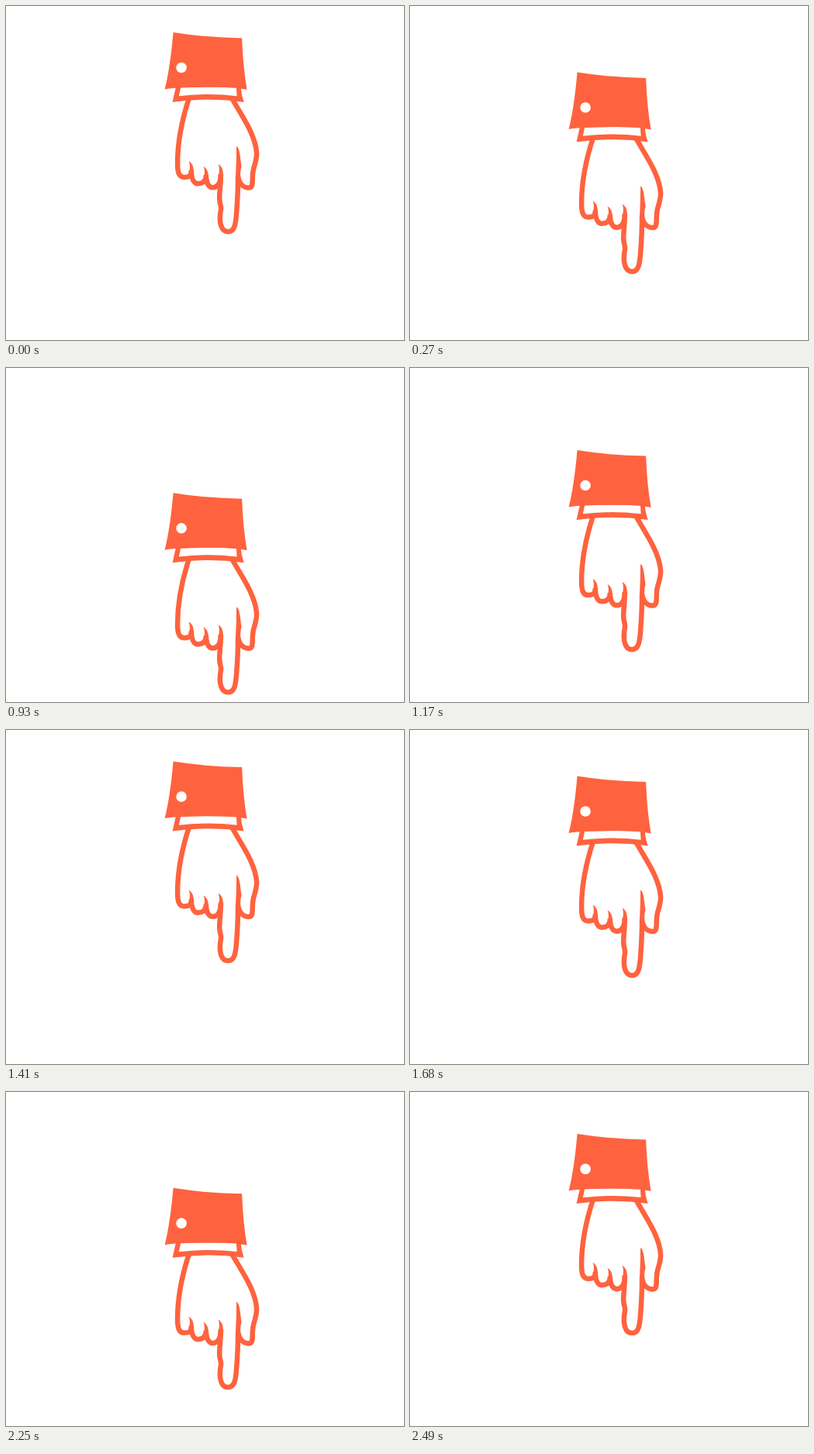
An HTML page for the animation above (2.52 s loop, 513 by 431 pixels).

```html
<!DOCTYPE html>
<html lang="en">
<head>
<meta charset="utf-8">
<title>Pointing hand</title>
<style>
html, body { margin: 0; width: 100%; height: 100%; overflow: hidden; background: #fff; }
svg { display: block; width: 513px; height: 431px; fill: #ff623e; }
.line { fill: none; stroke: #ff623e; stroke-width: 6.5; }
</style>
</head>
<body>
<svg viewBox="0 0 513 431">
  <defs>
    <path id="crease" d="M0 0C5 3 6.500 8 6.300 15H.3Q2.500 6 0 0Z"/>
  </defs>
  <g id="hand">
    <!-- sleeve and button -->
    <path d="M216 34Q260 41 304.500 41.500Q306 80 311 108Q296 104.500 258 104.500Q220 104.500 205 107.500Q212 80 216 34Z"/>
    <circle cx="226.500" cy="79.500" r="6.800" fill="#fff"/>
    <!-- cuff -->
    <path fill-rule="evenodd" d="M219.500 104L215 124Q261 117.500 307 124Q303.500 114 303 104Z
      M225.500 105.500L223.300 116.300Q261 111.800 298 116.200L297.300 105Q260 104 225.500 105.500Z"/>
    <!-- little finger, two middle fingers, index finger, thumb -->
    <g class="line">
      <path d="M236.600 118C227 147 221.500 178 221.500 203C221.500 214 223 221 230 221S239.300 219 239.300 212
        C239.300 224 243 229.300 248 229.300S258.300 227 258.300 218
        C258.300 229 262 234.300 267 234.300S277.300 230 277.300 217"/>
      <path d="M277.300 217C277.300 235 275 240 275.700 250C276 256 278 258 277.500 262
        C274 280 278 291.200 286.500 291.200S296.500 282 297.600 266Q299.600 240 299.500 219"/>
      <path d="M299.800 222C302 231 308 235 314 234.500C320.500 234 316.500 222 319.500 210
        C321.500 203 323.500 198 323.500 190C322 165 303 140 291 118"/>
    </g>
    <use href="#crease" x="236" y="200"/>
    <use href="#crease" x="255" y="207"/>
    <use href="#crease" x="274" y="204"/>
    <path d="M297.500 181C302 183 302 195 304 207Q302 213 302.700 222H296.300Q297.500 200 297.500 181Z"/>
  </g>
</svg>
<script>
const LOOP = 2520, STEP = 30, TRAVEL = 136;
// the bob is a cosine whose pace changes: [time in ms, half swings done]
const pace = [[0, 0], [270, .422], [630, .766], [1170, 1.481], [1680, 2.285], [1980, 2.817], [2160, 3.263], [2490, 3.75]];

function swings(t) {
  const i = Math.max(1, pace.findIndex(([time]) => time >= t));
  const [t0, s0] = pace[i - 1], [t1, s1] = pace[i];
  return s0 + (s1 - s0) * (t - t0) / (t1 - t0);
}
const shift = t => TRAVEL / 2 * (1 - Math.cos(Math.PI * swings(t)));

const hand = document.getElementById("hand");
const start = performance.now();
function draw() {
  const t = (performance.now() - start) % LOOP;
  const y = shift(Math.floor(t / STEP) * STEP);
  hand.setAttribute("transform", `translate(-0.4 ${y.toFixed(2)})`);
  requestAnimationFrame(draw);
}
draw();
</script>
</body>
</html>
```
